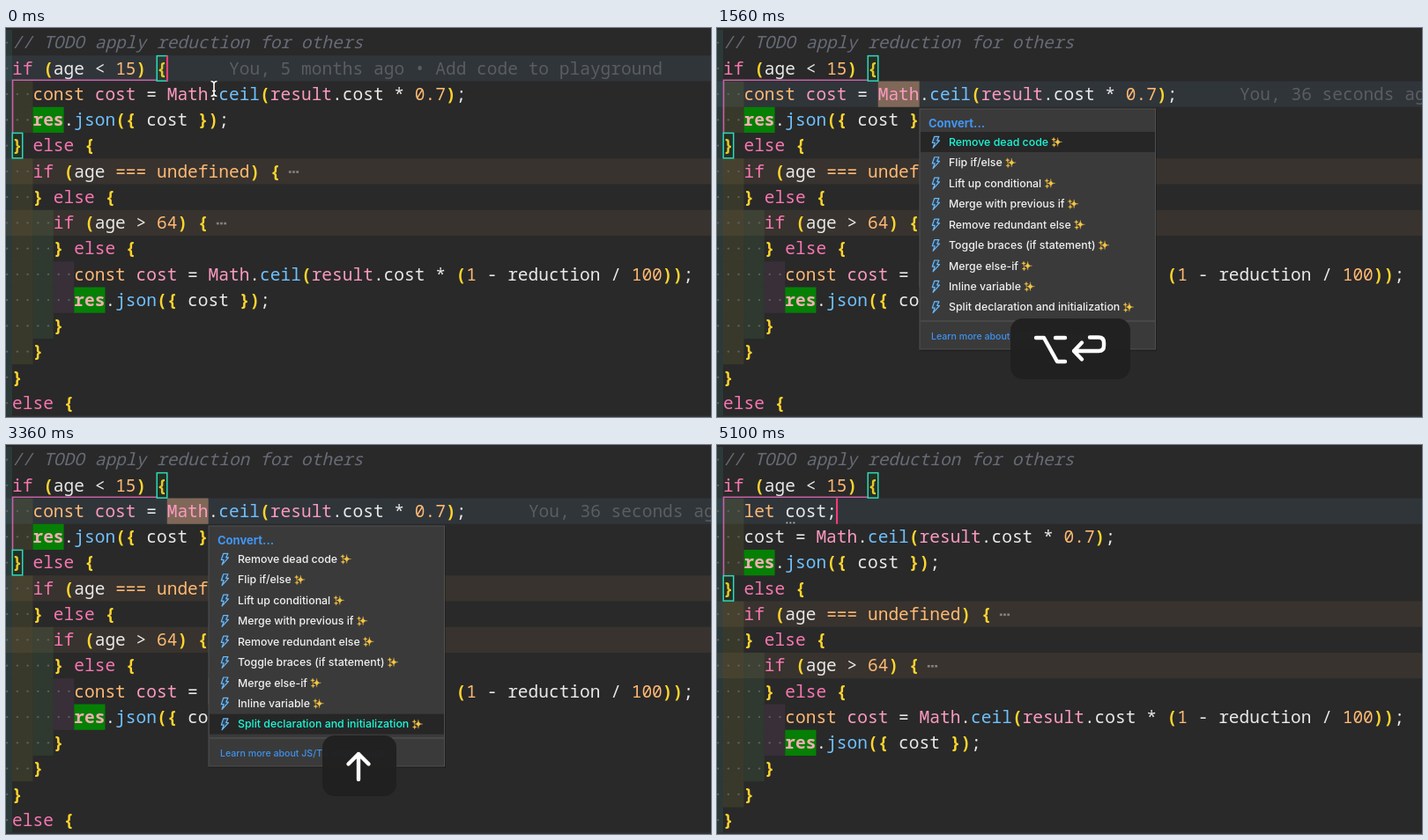
An HTML page for the animation above (5160 ms loop, 800 px wide and 442 px high).

```html
<!DOCTYPE html>
<html lang="en">
<head>
<meta charset="utf-8">
<title>Split declaration and initialization</title>
<style>
  html, body { margin: 0; width: 100%; height: 100%; overflow: hidden; background: #292929; }
  svg { display: block; width: 800px; height: 442px; }
  text { white-space: pre; }
  .code { font: 500 19.53px "Noto Sans Mono", "DejaVu Sans Mono", monospace; font-variant-ligatures: none; fill: #e9e9e9; }
  .key { fill: #f777b0; }
  .num { fill: #ffb974; }
  .obj { fill: #fb9abf; }
  .res { fill: #f3aeb4; font-weight: 700; }
  .fn { fill: #6fc1ff; }
  .br { fill: #ffd52e; font-weight: 600; }
  .code.note { fill: #5b5d60; font-weight: 400; }
  .comment { fill: #676b76; font-style: italic; font-weight: 400; }
  .menu { font: 500 12.35px Inter, "Liberation Sans", sans-serif; fill: #f0f0f0; }
  .menu .head { font-size: 13px; font-weight: 700; fill: #4196f5; }
  .menu .link { font-size: 10.6px; fill: #3d92f0; }
  .menu .on text { fill: #19f9d8; }
  .pick { fill: none; }
  .on .pick { fill: #262626; }
  .line { fill: none; stroke: #fff; stroke-width: 4.4; stroke-linecap: round; stroke-linejoin: round; }
</style>
</head>
<body>
<svg id="stage" viewBox="0 0 800 442"></svg>
<script>
const LOOP = 5160, STEP = 60;
const CHAR = 11.718, LEFT = 7, ROW = 29.25, TOP = 2;
const T = { click: 300, moveFrom: 480, moveTo: 840, menu: 1560, up: 3000, enter: 3600, edit: 3660, fade: 4560, gone: 4740 };

const colX = c => LEFT + c * CHAR;
const rowY = r => TOP + r * ROW;
const rect = (x, y, w, h, fill, more = '') =>
  `<rect x="${x}" y="${y}" width="${w}" height="${h}" fill="${fill}" ${more}/>`;
const cells = (r, c, n, fill, more) => rect(colX(c), rowY(r), n * CHAR, ROW, fill, more);
const text = (x, y, body, cls = '') => `<text x="${x}" y="${y}" class="${cls}">${body}</text>`;
const path = (d, more = '') => `<path d="${d}" ${more}/>`;
const group = (id, body) => `<g id="${id}">${body}</g>`;
const esc = s => s.replace(/</g, '&lt;').replace(/>/g, '&gt;');

const head = ['// TODO apply reduction for others', 'if (age < 15) {'];
const tail = [
  '  res.json({ cost });',
  '} else {',
  '  if (age === undefined) {~',
  '  } else {',
  '    if (age > 64) {~',
  '    } else {',
  '      const cost = Math.ceil(result.cost * (1 - reduction / 100));',
  '      res.json({ cost });',
  '    }',
  '  }',
  '}',
  'else {'
];
const before = [...head, '  const cost = Math.ceil(result.cost * 0.7);', ...tail];
const after = [...head, '  let cost;', '  cost = Math.ceil(result.cost * 0.7);', ...tail.slice(0, -1)];

const rules = [
  [/^(if|else)$/, 'key'],
  [/^(const|let|undefined|===|[\d.]+)$/, 'num'],
  [/^(Math|result|const cost)$/, 'obj'],
  [/^res$/, 'res'],
  [/^(ceil|json)$/, 'fn'],
  [/^[(){}]$/, 'br']
];

function paint(line) {
  if (line.startsWith('//')) return `<tspan class="comment">${line}</tspan>`;
  let last = '';
  return line.replace('~', '').replace(/[a-zA-Z]+|\d+(\.\d+)?|===|[(){}]|[<>]/g, word => {
    const name = last === 'const' ? 'const cost' : word;
    last = word;
    const rule = rules.find(([re]) => re.test(name));
    return rule ? `<tspan class="${rule[1]}">${word}</tspan>` : esc(word);
  });
}

// Cyan level sits half outside the stage; the next levels follow the indentation.
const tints = ['#ffff40', '#7fff7f', '#ff7fff'];

function editor(lines) {
  let back = '', front = '';
  const close = lines.indexOf('} else {');
  lines.forEach((line, r) => {
    const indent = line.search(/\S/);
    const y = rowY(r);
    if (line.endsWith('~')) {
      back += rect(0, y, 800, ROW, '#ffb86c', 'opacity=".07"');
      for (let i = 0; i < 3; i++)
        front += rect(colX(line.length) - 2.5 + i * 4.2, y + 14, 2.8, 2.6, '#85807a');
    }
    back += rect(0, y, LEFT, ROW, '#4fecec', 'opacity=".08"');
    for (let c = 0; c < indent; c += 2) back += cells(r, c, 2, tints[c / 2], 'opacity=".075"');
    for (let c = -1; c < indent; c++)
      back += `<circle cx="${colX(c + .5)}" cy="${y + 14.6}" r="1.2" fill="#5a605f"/>`;
    if (line.trim().startsWith('res')) back += cells(r, indent, 3, '#058005');
    front += text(LEFT, y + 21.3, paint(line), 'code');
  });
  const end = rowY(close);
  const frame = (r, c) => rect(colX(c) + .2, rowY(r) + .4, CHAR - .2, ROW - .8, '#006400',
    'fill-opacity=".1" stroke="#2cd9b8" stroke-width="1.5"');
  front += path(`M171 59.3H7.5V${end}`, 'fill="none" stroke="#c563a6" stroke-width="1.6"');
  front += frame(1, 14) + frame(close, 0);
  return [back, front];
}

const hint = [78.5, 82.5, 86.5].map(x => rect(x, 87.5, 1.8, 1.8, '#b5b5b5')).join('');
const [backA, frontA] = editor(before);
const [backB, frontB] = editor(after);
const mathMarks = cells(2, 15, 4, '#806859') + cells(9, 19, 4, '#806859');

const items = ['Remove dead code', 'Flip if/else', 'Lift up conditional', 'Merge with previous if',
  'Remove redundant else', 'Toggle braces (if statement)', 'Merge else-if', 'Inline variable',
  'Split declaration and initialization'];

const star = (x, y, s) => `M${x} ${y - s}Q${x} ${y} ${x + s} ${y}Q${x} ${y} ${x} ${y + s}Q${x} ${y} ${x - s} ${y}Q${x} ${y} ${x} ${y - s}Z`;
const sparkle = path(star(6.6, 0, 5) + star(2, -2.8, 2.4) + star(2.4, 3.4, 2.4), 'fill="#f6c644" stroke="#f6c644" stroke-width=".3"');
const bolt = path('M3.2-6.2H8.4L6.2-1.6H9L1.6 6.6L3.6 1H.8Z', 'fill="#2d4257" stroke="#6db9f5" stroke-width="1.2" stroke-linejoin="round"');

const menu =
  rect(230, 93, 269, 274, '#000', 'opacity=".25"') +
  rect(230, 92, 267.5, 273, '#3a3a3a', 'stroke="#505050"') +
  text(240, 112.5, 'Convert...', 'head') +
  items.map((label, i) => {
    const y = 129.5 + i * 23.45;
    return `<g class="item"><rect class="pick" x="231" y="${y - 11.5}" width="266" height="23"/>
      <g transform="translate(243.5 ${y})">${bolt}</g>${text(263, y + 4.3, label)}
      <g class="spark" data-y="${y}">${sparkle}</g></g>`;
  }).join('') +
  rect(231, 332.5, 266, 1, '#575757') +
  text(243, 353.8, 'Learn more about JS/TS refactorings', 'link');

const returnSign = x => path(`M${x + 19} 351.5H${x + 29}Q${x + 35} 351.5 ${x + 35} 357.5V361Q${x + 35} 367 ${x + 29} 367H${x + 1}M${x + 10} 357.5L${x + 1} 367L${x + 10} 376.5`, 'class="line"');
const keycap = (x, w, sign) => rect(x, 330, w, 69, '#202020', 'rx="14" opacity=".97"') + sign;
const optionSign = path('M362 352H371L386 379H395M384 352H395', 'class="line"');
const upSign = path('M400 380V351M388.5 362.5L400 351L411.5 362.5', 'class="line"');

const beam = 'M-3.5-8.5Q0-8.5 0-5.5Q0-8.5 3.5-8.5M0-5.5V5.5M-3.5 8.5Q0 8.5 0 5.5Q0 8.5 3.5 8.5M-2 2.5H2';
const mouse = path(beam, 'fill="none" stroke="#222" stroke-width="3.6"') +
  path(beam, 'fill="none" stroke="#f4f4f4" stroke-width="1.7"');

const stage = document.getElementById('stage');
stage.innerHTML =
  rect(0, 0, 800, 442, '#292929') +
  `<rect id="current" width="800" height="${ROW}" fill="#30353a"/>` +
  group('codeA', backA + group('marks', mathMarks) + frontA) +
  group('codeB', backB + frontB + hint) +
  group('noteA', text(colX(21), rowY(1) + 21.3, 'You, 5 months ago • Add code to playground', 'code note')) +
  group('noteB', text(colX(50), rowY(2) + 21.3, 'You, 36 seconds ago • Uncommitted changes', 'code note')) +
  rect(0, 440.5, 800, 1.5, '#343434') +
  `<rect id="caret" width="2" height="${ROW}" fill="#ff3b78"/>` +
  group('mouse', mouse) +
  `<g id="menu" class="menu">${menu}</g>` +
  group('keyOpen', keycap(333, 136, optionSign + returnSign(404))) +
  group('keyUp', keycap(359, 84, upSign)) +
  group('keyEnter', keycap(356, 93, returnSign(382)));

const el = Object.fromEntries([...stage.querySelectorAll('[id]')].map(n => [n.id, n]));
const rows = [...stage.querySelectorAll('.item')];
for (const row of rows) {
  const spark = row.querySelector('.spark');
  const x = 263 + row.querySelector('text').getComputedTextLength() + 4;
  spark.setAttribute('transform', `translate(${x} ${spark.dataset.y})`);
}

const show = (node, on) => { node.style.display = on ? '' : 'none'; };
const within = (t, a, b) => t >= a && t < b;
const clamp = v => Math.max(0, Math.min(1, v));

function caretAt(t) {
  if (t < T.click) return [1, 15, true];
  if (t < T.edit) return [2, 19, t < T.menu && (t - T.click) % 1000 < 500];
  return [2, 11, (t - T.edit) % 1000 < 500];
}

function draw(t) {
  const edited = t >= T.edit;
  show(el.codeA, !edited);
  show(el.codeB, edited);
  show(el.marks, t >= T.click);
  show(el.noteA, t < T.click);
  show(el.noteB, within(t, T.click, T.edit));

  const [r, c, lit] = caretAt(t);
  el.current.setAttribute('y', rowY(r));
  el.caret.setAttribute('x', colX(c) - .8);
  el.caret.setAttribute('y', rowY(r));
  show(el.caret, lit);

  const p = clamp((t - T.moveFrom) / (T.moveTo - T.moveFrom));
  const e = p * p * (3 - 2 * p);
  el.mouse.setAttribute('transform', `translate(${236 + 53 * e} ${69 + 52 * e})`);
  show(el.mouse, t < T.menu);

  show(el.menu, within(t, T.menu, T.enter));
  const picked = t < T.up ? 0 : items.length - 1;
  rows.forEach((row, i) => row.classList.toggle('on', i === picked));

  show(el.keyOpen, within(t, T.menu, T.up));
  show(el.keyUp, within(t, T.up, T.enter));
  show(el.keyEnter, within(t, T.enter, T.gone));
  el.keyEnter.style.opacity = 1 - clamp((t - T.fade) / (T.gone - T.fade));
}

const start = performance.now();
function tick() {
  const t = (performance.now() - start) % LOOP;
  draw(Math.floor(t / STEP) * STEP);
  requestAnimationFrame(tick);
}
draw(0);
requestAnimationFrame(tick);
</script>
</body>
</html>
```
